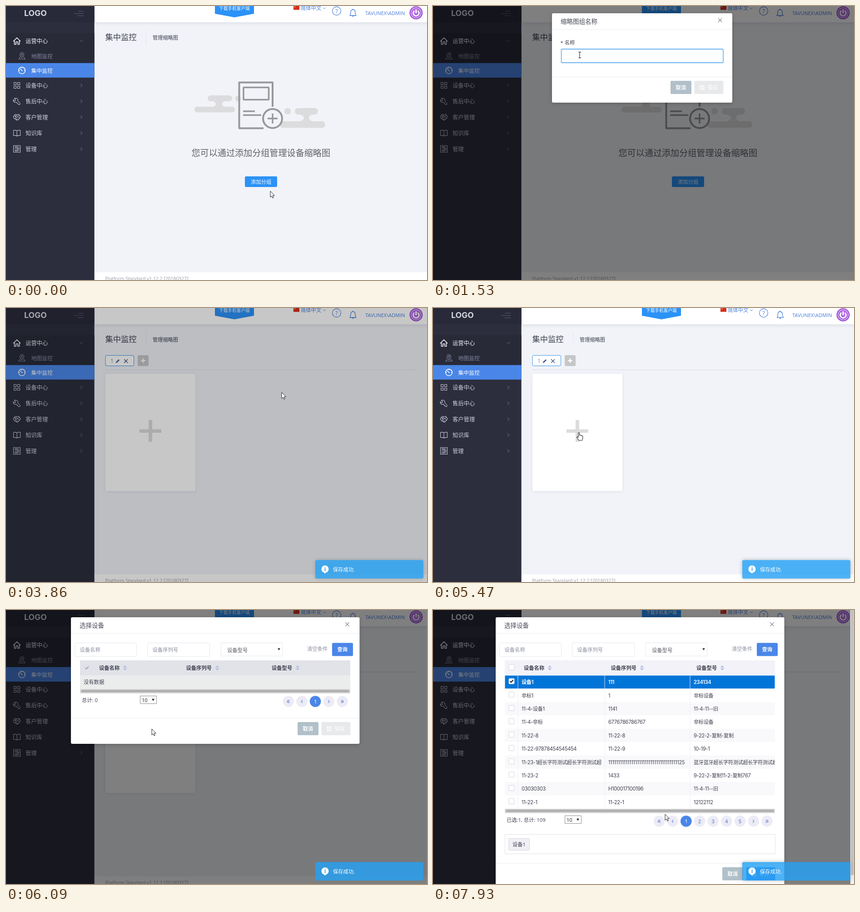
Recreate the animation shown at these times as an HTML page with a canvas. Size 927 by 604 pixels, loop 8000 ms.

```html
<!DOCTYPE html>
<html lang="zh">
<head>
<meta charset="utf-8">
<title>集中监控</title>
<style>
html, body { margin: 0; width: 100%; height: 100%; overflow: hidden; background: #f1f3f8; }
canvas { display: block; width: 100vw; height: 100vh; }
</style>
</head>
<body>
<canvas id="stage"></canvas>
<script>
const W = 927, H = 604, LOOP = 8000;
const canvas = document.getElementById('stage');
const ctx = canvas.getContext('2d');
const ratio = window.devicePixelRatio || 1;
canvas.width = W * ratio;
canvas.height = H * ratio;

const UI = '"Open Sans", "Noto Sans CJK SC", "Noto Sans CJK", sans-serif';
const GRID = 'Inter, "Noto Sans CJK SC", "Noto Sans CJK", sans-serif';
const BLUE = '#4a86e8', INK = '#3f4150', MUTED = '#8a8d9f';

const clamp = v => Math.max(0, Math.min(1, v));
const ramp = (t, a, b) => clamp((t - a) / (b - a));
const easeOut = p => 1 - (1 - p) ** 2;
const smooth = p => p * p * (3 - 2 * p);

// ---- drawing helpers ----
function text(s, x, cy, size, color, { weight = 400, font = UI, align = 'left', gap = 0 } = {}) {
  ctx.font = `${weight} ${size}px ${font}`;
  ctx.textAlign = align;
  ctx.letterSpacing = gap + 'px';
  ctx.fillStyle = color;
  ctx.fillText(s, x, cy + size * 0.38);
  ctx.letterSpacing = '0px';
}
function rect(x, y, w, h, color) {
  ctx.fillStyle = color;
  ctx.fillRect(x, y, w, h);
}
function box(x, y, w, h, r, fill, stroke, line = 1) {
  ctx.beginPath();
  ctx.roundRect(x, y, w, h, r);
  if (fill) { ctx.fillStyle = fill; ctx.fill(); }
  if (stroke) { ctx.strokeStyle = stroke; ctx.lineWidth = line; ctx.stroke(); }
}
function shadowed(color, blur, dy, draw) {
  ctx.save();
  ctx.shadowColor = color;
  ctx.shadowBlur = blur * ratio;
  ctx.shadowOffsetY = dy * ratio;
  draw();
  ctx.restore();
}
function path(d, x, y, { fill, stroke, line = 1.3 } = {}) {
  const p = new Path2D(d);
  ctx.save();
  ctx.translate(x, y);
  if (fill) { ctx.fillStyle = fill; ctx.fill(p); }
  if (stroke) {
    ctx.strokeStyle = stroke;
    ctx.lineWidth = line;
    ctx.lineJoin = 'round';
    ctx.stroke(p);
  }
  ctx.restore();
}
function disc(x, y, r, fill, stroke, line = 1) {
  box(x - r, y - r, 2 * r, 2 * r, r, fill, stroke, line);
}
function cross(x, y, r, color, line = 1.3) {
  path(`M${-r} ${-r}L${r} ${r}M${r} ${-r}L${-r} ${r}`, x, y, { stroke: color, line });
}
const arrowDown = (x, y, r, color) => path(`M${-r} ${-r * 0.8}H${r}L0 ${r}Z`, x, y, { fill: color });

// ---- sidebar ----
const SIDE = 194.6;
const ICONS = {
  home: 'M-8 1L0 -7L8 1M-5.5 -1V7.5H-2V2H2V7.5H5.5V-1',
  pin: 'M0 4C-3 1 -4.5 -1 -4.5 -3A4.5 4.5 0 0 1 4.5 -3C4.5 -1 3 1 0 4ZM-1.6 -3A1.6 1.6 0 1 0 1.6 -3A1.6 1.6 0 1 0 -1.6 -3M-4 2L-7 7H7L4 2',
  gauge: 'M-7.3 0A7.3 7.3 0 1 0 7.3 0A7.3 7.3 0 1 0 -7.3 0M-4 -4L1.5 1.5M0 -7V-5M7 0H5M-7 0H-5M5 -5L4 -4',
  tiles: 'M-6.5 -6.5H-1.5V-1.5H-6.5ZM1.5 -6.5H6.5V-1.5H1.5ZM-6.5 1.5H-1.5V6.5H-6.5ZM1.5 1.5H6.5V6.5H1.5Z',
  wrench: 'M-6 -6.5L-3 -3.5L-3.5 -1.5L-5.5 -1L-8 -3.5C-8.5 1 -5.5 3.5 -1.5 2L3.5 7C6 8.5 8 6 6.5 4L2 -1C3 -5 0 -8 -6 -6.5',
  hands: 'M-8 -1L-4 -6.5L0 -5L4 -6.5L8 -1L6 2.5L1 7L-6 3ZM0 -5L-4 -1L-1 0.5L2 -2L6 2.5M-5 4L-2 1.5M-2 6L1 3M1 7L4 4M-7 -3L-3 -3M3 -4L6 -3',
  book: 'M0 -5C-2 -6.3 -5 -6.3 -7.5 -6V5.5C-5 5.2 -2 5.2 0 6.7C2 5.2 5 5.2 7.5 5.5V-6C5 -6.3 2 -6.3 0 -5V6.7',
  sliders: 'M-7.5 -7.5H7.5V7.5H-7.5ZM-5.5 -4H-3M1 -4H5.5M-5.5 0H1M-5.5 4H-3M1 4H5.5M-3 -5H1V-3H-3ZM1 -1H5V1H1ZM-3 3H1V5H-3Z'
};
const MENU = [
  ['tiles', '设备中心', 175], ['wrench', '售后中心', 210], ['hands', '客户管理', 245],
  ['book', '知识库', 280], ['sliders', '管理', 315]
];
function sidebar() {
  rect(0, 0, SIDE, H, '#2c2e3e');
  rect(0, 0, SIDE, 36, '#292a39');
  rect(0, 60, SIDE, 66, '#282a38');
  rect(0, 125.8, SIDE, 32, BLUE);
  text('LOGO', 40, 15.5, 17.6, '#d6d7df', { weight: 700, font: GRID });
  path('M159 11.5H171M150 16.5H171M157 21.5H171', 0, 0, { stroke: '#575a70', line: 1 });

  path(ICONS.home, 24, 77, { stroke: '#f2f3f8', line: 1.6 });
  text('运营中心', 43, 77, 12.3, '#f4f5fa', { weight: 500 });
  path('M-3.5 -2L0 1.5L3.5 -2', 166, 77, { stroke: '#6c7088', line: 1 });
  path(ICONS.pin, 35, 110, { stroke: '#8488a3', line: 1.1 });
  text('地图监控', 55.5, 111, 11.8, '#8488a3');
  path(ICONS.gauge, 35, 142, { stroke: '#fff', line: 1.5 });
  text('集中监控', 55.5, 143, 11.8, '#fff', { weight: 500 });
  for (const [icon, label, y] of MENU) {
    path(ICONS[icon], 24, y, { stroke: '#c3c5d2', line: 1.1 });
    text(label, 43, y, 12.3, '#cfd1dc');
    path('M-2 -3.5L1.5 0L-2 3.5', 166, y, { stroke: '#8488a0', line: 1 });
  }
}

// ---- top bar ----
function topBar(t) {
  shadowed('rgba(70,70,110,.16)', 8, 1, () => rect(SIDE, -10, W, 46, '#fff'));
  path('M460 0H546V17L503 25L460 17Z', 0, 0, { fill: '#2b92f7' });
  text('下载手机客户端', 469, 5.5, 9.7, '#fff', { weight: 500 });
  rect(633, 0, 13, 8.5, '#d5301f');
  rect(635, 1, 2, 2, '#f4c43c');
  text('简体中文', 649, 4.5, 11.3, '#4a7fdc');
  path('M-3 -1.5L0 1.5L3 -1.5', 701, 5, { stroke: '#4a7fdc', line: 1 });
  disc(728, 11, 9.3, null, '#4a7fdc', 1.2);
  text('?', 728, 11, 13, '#4a7fdc', { align: 'center' });

  const swing = t > 4170 && t < 5780 ? Math.sin((t - 4170) / 130) * 0.1 : 0;
  ctx.save();
  ctx.translate(764, 8);
  ctx.rotate(swing);
  path('M-7 13C-5 11 -5 9 -5 6C-5 2 -3 0 0 0C3 0 5 2 5 6C5 9 5 11 7 13ZM0 0V-2M-2 13.5Q0 16.5 2 13.5', 0, 0, { stroke: '#4a7fdc', line: 1.3 });
  ctx.restore();

  text('TAVUNEX\\ADMIN', 878.5, 15.5, 11, '#4a7fdc', { align: 'right' });
  const g = ctx.createRadialGradient(903, 12, 2, 903, 15, 15);
  g.addColorStop(0, '#c078ec');
  g.addColorStop(1, '#9a4fd2');
  disc(903, 15, 14.5, g);
  disc(903, 15, 11.2, null, '#dfbdf5', 1.4);
  path('M-4 -5A6.4 6.4 0 1 0 4 -5M0 -8V0', 903, 15.5, { stroke: '#fff', line: 2.8 });
}

// ---- page content ----
function emptyState() {
  const soft = '#dcdcde', gray = '#97989b';
  box(444, 197, 54, 13, 6.5, soft);
  box(415, 222, 89, 12.5, 6, soft);
  path('M455 209Q469 216 455 223H482Q469 216 482 209Z', 0, 0, { fill: soft });
  disc(511, 204, 6.5, soft);
  disc(620, 232, 7.3, soft);
  box(636, 225, 51, 14.5, 7, soft);
  box(603, 254, 100, 14.5, 7, soft);
  path('M648 239Q664 246.5 648 254.5H674Q660 246.5 674 239Z', 0, 0, { fill: soft });
  disc(587, 248, 21, '#f1f3f8', gray, 4);
  path('M587 222V168.5H513.5V269.5H567', 0, 0, { stroke: gray, line: 4 });
  box(523, 179.5, 55.5, 27, 1, null, gray, 3.5);
  path('M522 232H548M522 240.5H562M576 248H598M587 237V259', 0, 0, { stroke: gray, line: 3.4 });
  text('您可以通过添加分组管理设备缩略图', 408.5, 324, 19.1, '#5f6168');
  box(526, 375.5, 71, 23.5, 3, '#2b92f7');
  text('添加分组', 539, 387.5, 11.3, '#fff', { weight: 500 });
}
function groupTab() {
  box(219, 104.5, 62.5, 23, 2.5, '#fff', '#3d94ea');
  text('1', 230, 116.5, 12, '#7e8398');
  path('M-4.5 4.5L-3.5 1.5L2 -4L4 -2L-1.5 3.5Z', 246, 117, { fill: '#47608a' });
  cross(264, 117, 4, '#47608a', 1.6);
  box(290, 104, 24, 24, 3, '#c5c6c8');
  path('M-5 0H5M0 -5V5', 302, 116, { stroke: '#fff', line: 2.4 });
  rect(219, 136, 685, 1, '#dcdee3');
  shadowed('rgba(80,80,120,.12)', 6, 1, () => box(219, 145, 198, 258.5, 3, '#fff'));
  rect(294, 267.5, 48, 7.5, '#dcdcdc');
  rect(314, 247, 8, 48, '#dcdcdc');
}
function page(t) {
  rect(0, 0, W, H, '#f1f3f8');
  rect(SIDE, 587, W, 17, '#fff');
  text('Platform Standard v1.12.2 [20180327]', 218.5, 601, 10.4, '#9a9ca8');
  topBar(t);
  text('集中监控', 218.5, 68, 17.3, INK);
  rect(308, 52, 1, 32, '#e2e4ec');
  text('管理缩略图', 323, 69.5, 11.2, INK);
  if (t < 3550) emptyState(); else groupTab();
  sidebar();
}

// ---- dialogs ----
function dialog(x, w, bottom, title) {
  shadowed('rgba(0,0,0,.2)', 8, 2, () => box(x, 16, w, bottom - 16, 3, '#fff'));
  text(title, x + 19, 34, 13.5, '#484a58');
  cross(x + w - 27, 31.5, 4.2, '#7b7d88', 1.2);
  rect(x, 51, w, 1, '#ebedf2');
}
function dialogButtons(x, y, fill) {
  box(x, y, 46, 29, 2.5, '#b1c0c9');
  text('取消', x + 11.5, y + 15, 11.3, '#fff', { weight: 700 });
  box(x + 52.5, y, 64, 29, 2.5, fill);
  path('M-4.5 -4.5H3L4.5 -3V4.5H-4.5ZM-2.5 -4.5V-1.5H2V-4.5M-2.5 4.5V1.5H2.5V4.5', x + 69.5, y + 15, { stroke: '#fff', line: 1.2 });
  text('保存', x + 81.5, y + 15, 11.3, '#fff', { weight: 500 });
}
function nameDialog(t) {
  const typed = t >= 2310;
  dialog(262, 397, 213, '缩略图组名称');
  text('* 名称', 280.5, 81, 11.3, INK);
  box(282.5, 95, 356.5, 30, 2, '#fff', '#3f9bec', 1.3);
  rect(262, 156, 397, 1, '#ebedf2');
  if (typed) text('1', 293.5, 110.5, 11.5, '#6d7080');
  const caret = t > 900 && t < 1530 || t >= 1990 && t < 2810;
  if (caret) rect(typed ? 300 : 294, 103, 1, 14, '#333');
  if (t >= 2390) {
    box(281.5, 125.5, 359, 20, 0, '#fff', '#dcdcdc');
    text('1', 288, 136, 10.5, '#1aa274', { weight: 700 });
  }
  dialogButtons(523, 165, t >= 3080 ? '#1b69bb' : typed ? BLUE : '#e8e9eb');
}

const ROWS = [
  ['设备1', '111', '234134'],
  ['非标1', '1', '非标设备'],
  ['11-4-设备1', '1141', '11-4-11--旧'],
  ['11-4-非标', '6776786786767', '非标设备'],
  ['11-22-8', '11-22-8', '9-22-2-复制-复制'],
  ['11-22-97878454545454', '11-22-9', '10-19-1'],
  ['11-23-1超长字符测试超长字符测试超', '1'.repeat(37) + '25', '蓝牙蓝牙超长字符测试超长字符测试超长'],
  ['11-23-2', '1433', '9-22-2-复制11-2-复制767'],
  ['03030303', 'H100017100196', '11-4-11--旧'],
  ['11-22-1', '11-22-1', '12122112']
];
const COLS = [192, 383, 571, 758], ROW_H = 29.4;

function checkbox(x, y, checked) {
  box(x - 6, y - 6, 12, 12, 1.5, '#fff', '#d2d3dc');
  if (checked) path('M-3.5 0L-1 2.5L3.5 -3', x, y, { stroke: '#222', line: 2 });
}
function tableRows(picked) {
  ROWS.forEach((row, i) => {
    const y = 144 + i * ROW_H, on = picked && i === 0;
    rect(163, y, 595, ROW_H, i % 2 ? '#fff' : '#f9f9fb');
    if (on) rect(163.5, y + 0.5, 594, ROW_H - 0.7, '#0275d8');
    checkbox(178, y + 13, on);
    row.forEach((cell, c) => {
      rect(COLS[c] - 0.5, y, 1, ROW_H, on ? '#d7e8f8' : '#eef0f4');
      ctx.save();
      ctx.beginPath();
      ctx.rect(COLS[c], y, COLS[c + 1] - COLS[c], ROW_H);
      ctx.clip();
      text(cell, COLS[c] + 8, y + 15, 11.2, on ? '#fff' : INK,
        { weight: on ? 600 : 400, font: GRID, gap: -0.35 });
      ctx.restore();
    });
  });
}
function pager(y, labels, current) {
  labels.forEach((label, i) => {
    const x = 740.5 - (labels.length - 1 - i) * 29.7, on = label === current;
    disc(x, y, 12.3, on ? BLUE : '#ecebf6');
    text(label, x, y - (isNaN(label) ? 1 : 0), isNaN(label) ? 14 : 11, on ? '#fff' : '#5a78c8', { align: 'center', font: GRID });
  });
}
function deviceDialog(t) {
  const loaded = t >= 6240, picked = t >= 7470;
  const dy = loaded ? 264 : 0, foot = dy + (picked ? 56 : 0);
  ctx.save();
  ctx.translate(picked ? -5 : 0, 0);
  dialog(143, 635.5, 295 + foot, '选择设备');

  for (const [x, w, label] of [[151, 136, '设备名称'], [311, 137, '设备序列号']]) {
    box(x + 0.5, 72.5, w, 30, 2, '#fff', '#e6e8ef');
    text(label, x + 11.5, 88, 11.3, MUTED);
  }
  box(473, 72.5, 136, 29, 2, '#fff', '#e6e8ef');
  text('设备型号', 487, 89, 11.3, '#575962');
  arrowDown(601, 86.5, 2.8, '#333');
  text('清空条件', 663, 86, 11.3, MUTED);
  box(718, 72.4, 46, 29, 2.5, BLUE);
  text('查询', 729.5, 87, 11.3, '#fff', { weight: 700 });

  rect(163, 111, 595, 33, loaded ? '#f3f2f9' : '#e2e2e9');
  if (loaded) checkbox(178, 126);
  else path('M-4 0L-1 3L4 -3', 178, 127, { stroke: '#a9abb3', line: 2 });
  for (const [label, x, sort] of [['设备名称', 205, 262], ['设备序列号', 396.5, 465], ['设备型号', 585, 642]]) {
    text(label, x, 128, 11.3, INK, { weight: 600 });
    path('M-4.5 -1H4.5L0 -5.5ZM-4.5 1H4.5L0 5.5Z', sort, 127.5, { fill: '#b3bfde' });
  }
  if (loaded) tableRows(picked);
  else {
    rect(163, 144, 595, 30, '#ebecec');
    text('没有数据', 171, 159, 11.3, INK);
  }
  rect(163, 174 + dy, 595, 10, '#dcdcdd');
  box(165, 176 + dy, 591, 5.5, 2.7, '#b0b0b1');

  const total = `总计: ${loaded ? 109 : 0}`;
  text(picked ? '已选:1, ' + total : total, 167, 198.5 + dy, 11.3, INK);
  box(295.5, 189.5 + dy, 36, 17, 0, '#fff', '#8d8d8d');
  text('10', 299, 198.5 + dy, 11, '#222');
  arrowDown(324, 198 + dy, 2.8, '#222');
  pager(201.5 + dy, loaded ? [...'«‹12345›»'] : [...'«‹1›»'], '1');

  if (picked) {
    box(163.5, 494.5, 595, 43, 0, '#fff', '#e1e2e8');
    box(171.5, 503.5, 46, 26, 2, '#f0f0f5', '#d6d7df');
    text('设备1', 180, 517, 11.3, INK);
  }
  rect(143, 238 + foot, 635.5, 1, '#ebedf2');
  dialogButtons(642, 247 + foot, picked ? BLUE : '#e8e9eb');
  ctx.restore();
}
function slideIn(p, height, draw) {
  if (p <= 0) return;
  ctx.save();
  ctx.globalAlpha = clamp(p * 2);
  ctx.translate(0, -0.25 * height * (1 - easeOut(p)));
  draw();
  ctx.restore();
}
function shade(t) {
  const a = t < 3400 ? ramp(t, 230, 530) : t < 5000 ? 1 - ramp(t, 3620, 4050) : ramp(t, 5540, 5780);
  if (a > 0) rect(0, 0, W, H, `rgba(0,0,0,${a * 0.5})`);
}
function toast(t) {
  const a = ramp(t, 3640, 3850);
  if (!a) return;
  const body = () => box(681, 555.7, 238, 40.5, 3, '#24a0f4');
  ctx.save();
  ctx.globalAlpha = a * 0.81;
  // keep the shadow outside, since the body is see-through
  ctx.save();
  ctx.beginPath();
  ctx.rect(0, 0, W, H);
  ctx.roundRect(681, 555.7, 238, 40.5, 3);
  ctx.clip('evenodd');
  shadowed('rgba(120,120,120,.6)', 8, 0, body);
  ctx.restore();
  body();
  ctx.globalAlpha = a;
  disc(702.5, 575.5, 8, '#fff');
  path('M-4 6L0 10L3 6Z', 702.5, 575.5, { fill: '#fff' });
  text('i', 702.5, 575.5, 12, '#2f9fea', { weight: 700, align: 'center' });
  text('保存成功.', 720, 576.5, 11.3, '#fff', { weight: 500 });
  ctx.restore();
}

// ---- pointer ----
const MOVES = [
  [0, 582, 408], [70, 582, 408], [160, 571, 389], [660, 571, 389], [1100, 390, 165], [1440, 323, 108],
  [2600, 323, 108], [2950, 597, 219], [3140, 607, 186], [4140, 607, 186], [4620, 350, 334],
  [4940, 321, 300], [5200, 320, 274], [5700, 320, 274], [5840, 321, 262], [6180, 321, 262],
  [6640, 207, 166], [6860, 173, 162], [7000, 173, 162], [7200, 171, 160], [7500, 171, 160], [7920, 511, 450]
];
const SHAPES = [
  [0, 'arrow'], [110, 'hand'], [530, 'arrow'], [1330, 'beam'], [2690, 'arrow'], [3080, 'hand'],
  [3400, 'arrow'], [4450, 'hand'], [5780, 'arrow']
];
function pointer(t) {
  const i = MOVES.findLastIndex(m => m[0] <= t);
  const a = MOVES[i], b = MOVES[i + 1] || a;
  const p = b === a ? 0 : smooth(ramp(t, a[0], b[0]));
  const x = a[1] + (b[1] - a[1]) * p, y = a[2] + (b[2] - a[2]) * p;
  const shape = SHAPES.findLast(s => s[0] <= t)[1];
  if (shape === 'arrow') {
    path('M0 0V13.5L3 10.7L5 15.3L7.2 14.3L5.2 9.8H9.4Z', x, y, { fill: '#fff', stroke: '#222', line: 1 });
  } else if (shape === 'hand') {
    path('M0 1.5Q1.3 -0.5 2.6 1.5V6.5Q4 5.3 5 7Q6.5 6 7.4 7.6Q9.5 7 9.7 9V13Q9.5 16 8 18H1.5Q-0.5 15 -3.5 11.5Q-3 9 0 11Z', x, y, { fill: '#fff', stroke: '#222', line: 1.1 });
  } else {
    path('M-3 -6.5H-1L0 -5.5L1 -6.5H3M0 -5.5V5.5M-3 6.5H-1L0 5.5L1 6.5H3', x, y, { stroke: '#333', line: 1.2 });
  }
}

function draw(t) {
  ctx.setTransform(ratio, 0, 0, ratio, 0, 0);
  page(t);
  shade(t);
  const naming = t < 3310 ? ramp(t, 450, 760) : 1 - ramp(t, 3310, 3610);
  slideIn(naming, 197, () => nameDialog(t));
  slideIn(ramp(t, 5770, 6050), 280, () => deviceDialog(t));
  if (t >= 7470) {
    rect(919, 0, 8, H, '#f0f0f1');
    box(920, -4, 6.5, 589, 3, '#bfc0c2');
  }
  toast(t);
  pointer(t);
}
function frame() {
  draw(performance.now() % LOOP);
  requestAnimationFrame(frame);
}
frame();
</script>
</body>
</html>
```
